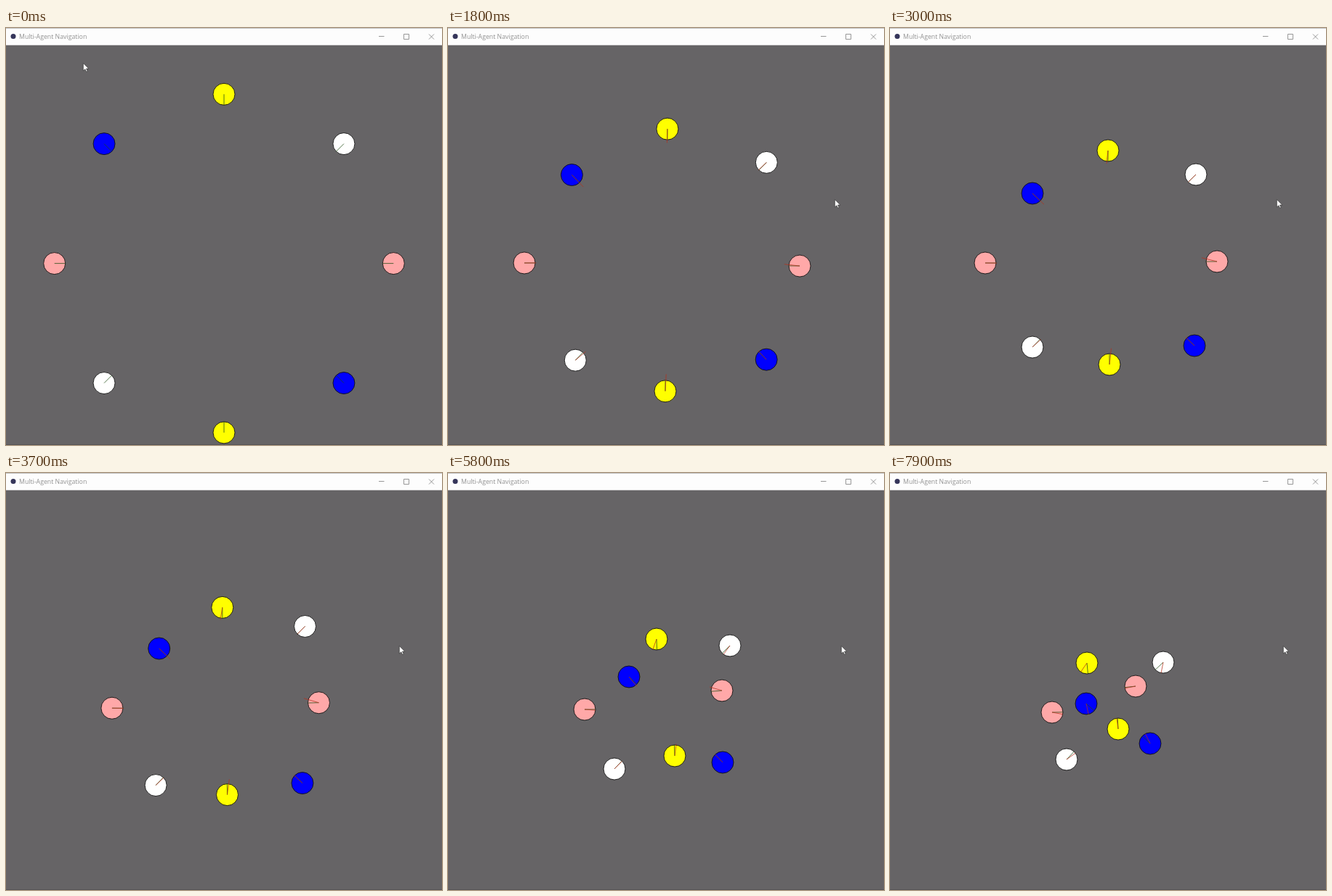
An HTML page for the animation above (8000 ms loop, 600 px wide and 575 px high).

```html
<!DOCTYPE html>
<html lang="en">
<head>
<meta charset="utf-8">
<title>Multi-Agent Navigation</title>
<style>
  html, body { margin: 0; width: 100%; height: 100%; overflow: hidden; background: #666466; }
  svg { display: block; width: 600px; height: 575px; }
  .title { font: 8.75px "Open Sans", "Noto Sans", sans-serif; fill: #929292; }
  .buttons { fill: none; stroke: #8c8c8c; stroke-width: .9; }
  .body { stroke: #111; stroke-width: .9; }
  .goal { stroke: #1c4a10; stroke-width: .75; }
  .velocity { stroke: #b5301c; stroke-width: .75; }
</style>
</head>
<body>
<svg viewBox="0 0 600 575">
  <rect width="600" height="575" fill="#666466"/>
  <rect y="574" width="600" height="1" fill="#555455"/>
  <rect width="600" height="23.7" fill="#fdfdfd"/>
  <rect width="600" height="1" fill="#c4c4c4"/>
  <circle cx="10" cy="11.5" r="3.5" fill="#35355a"/>
  <text class="title" x="18" y="15.4">Multi-Agent Navigation</text>
  <path class="buttons" d="M513 11.5h7.5M547.5 8.5h7v7h-7zM582 8.5l7 7M589 8.5l-7 7"/>
  <g id="agents"></g>
  <path id="cursor" d="M0 0v10.5l2.5-2.2 1.8 3.5 1.6-.8-1.7-3.4h3.3z" fill="#fff" stroke="#333" stroke-width=".7"/>
</svg>
<script>
const LOOP = 8000, STEP = 100, RADIUS = 15;
const CENTER = { x: 300, y: 324.6 }, RING = 233.3;
const COLORS = ["#ffa8a8", "#0000fe", "#ffff00", "#ffffff"];

// Each agent leaves the ring and passes three points, clockwise from the right
const KEY_TIMES = [0, 3000, 5800, 7900];
const ROUTES = [
  [[450, 322], [377, 300], [338, 294]],
  [[419, 438], [378, 399], [358, 373]],
  [[302, 464], [312, 390], [314, 353]],
  [[196, 440], [229, 408], [243, 395]],
  [[131, 324], [188, 326], [223, 330]],
  [[196, 228], [249, 281], [270, 318]],
  [[300, 169], [287, 229], [271, 262]],
  [[421, 202], [388, 238], [376, 261]]
];

const setAttrs = (el, attrs) => {
  for (const key in attrs) el.setAttribute(key, attrs[key]);
};
const svgEl = (tag, attrs, parent) => {
  const el = document.createElementNS("http://www.w3.org/2000/svg", tag);
  setAttrs(el, attrs);
  return parent.appendChild(el);
};
const mix = (a, b, k) => a + (b - a) * k;
const ringPoint = i => {
  const a = i * Math.PI / 4;
  return [CENTER.x + RING * Math.cos(a), CENTER.y + RING * Math.sin(a)];
};

// Smooth cubic through all points of a route
function pointAt(route, t) {
  let x = 0, y = 0;
  route.forEach(([px, py], i) => {
    const weight = KEY_TIMES.reduce((w, key, j) =>
      j === i ? w : w * (t - key) / (KEY_TIMES[i] - key), 1);
    x += px * weight;
    y += py * weight;
  });
  return [x, y];
}

const layer = document.getElementById("agents");
const cursor = document.getElementById("cursor");
const agents = ROUTES.map((points, i) => ({
  route: [ringPoint(i), ...points],
  goal: ringPoint(i + 4),
  body: svgEl("circle", { class: "body", r: RADIUS, fill: COLORS[i % 4] }, layer),
  goalLine: svgEl("line", { class: "goal" }, layer),
  velocityLine: svgEl("line", { class: "velocity" }, layer)
}));

function drawLine(el, x, y, dx, dy, length) {
  const k = length / Math.hypot(dx, dy);
  setAttrs(el, { x1: x, y1: y, x2: x + dx * k, y2: y + dy * k });
}

function drawAgent({ route, goal, body, goalLine, velocityLine }, t) {
  const [x, y] = pointAt(route, t);
  const [nextX, nextY] = pointAt(route, t + STEP);
  const dx = nextX - x, dy = nextY - y;
  const reach = Math.max(RADIUS, 7.5 * Math.hypot(dx, dy));
  setAttrs(body, { cx: x, cy: y });
  drawLine(goalLine, x, y, goal[0] - x, goal[1] - y, RADIUS);
  drawLine(velocityLine, x, y, dx, dy, reach);
  velocityLine.setAttribute("opacity", t > 0 ? 1 : 0);
}

function drawCursor(t) {
  const k = Math.min(1, t / 600);
  const ease = k * k * (3 - 2 * k);
  const moved = t >= 3300;
  const x = moved ? 541.3 : mix(106.3, 532.3, ease);
  const y = moved ? 238.5 : mix(48.5, 236.5, ease);
  cursor.setAttribute("transform", `translate(${x} ${y})`);
}

function draw(t) {
  agents.forEach(agent => drawAgent(agent, t));
  drawCursor(t);
}

const start = performance.now();
function tick() {
  const t = (performance.now() - start) % LOOP;
  draw(Math.floor(t / STEP) * STEP);
  requestAnimationFrame(tick);
}
tick();
</script>
</body>
</html>
```
